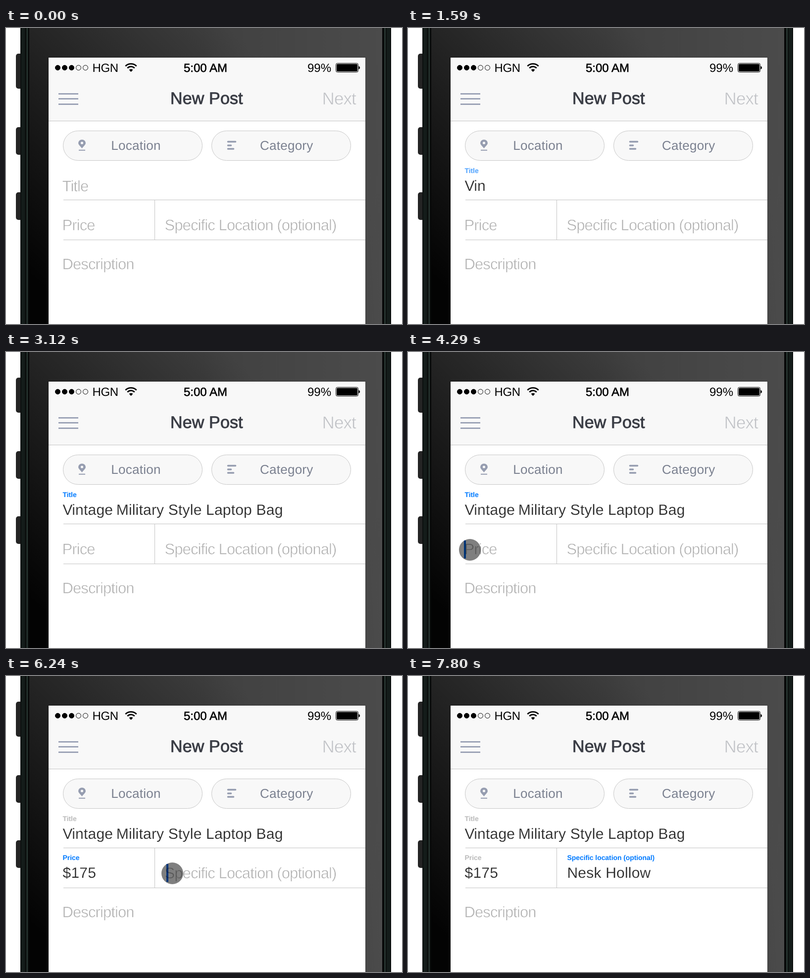
Animation, 800 px wide and 600 px high, one loop 8000 ms. Source, as an HTML page:

```html
<!DOCTYPE html>
<html lang="en">
<head>
<meta charset="utf-8">
<title>New Post form</title>
<style>
  html, body { margin: 0; width: 100%; height: 100%; overflow: hidden; background: #fff; }
  svg { display: block; width: 800px; height: 600px; }
  text { font-family: "Liberation Sans", Arial, sans-serif; white-space: pre; text-rendering: geometricPrecision; }
  .light { font-size: 31px; letter-spacing: -.9px; fill: #b0b0b0; stroke: #fff; stroke-width: .7px; }
  .next { font-size: 35px; fill: #c0c2c6; stroke: #f8f8f8; }
  .typed { font-size: 30px; letter-spacing: .2px; fill: #2b2b2b; stroke: #fff; stroke-width: .2px; }
  .label { font-size: 14px; font-weight: bold; letter-spacing: -.08px; }
  .title { font-size: 34px; letter-spacing: .15px; fill: #3a3d45; stroke: #3a3d45; stroke-width: .9px; }
  .status { font-size: 24px; }
  .pill text { font-size: 26px; letter-spacing: .25px; fill: #7b8190; }
  .pill rect { fill: #f8f8f8; stroke: #c8c8c8; }
  .rule { stroke: #c4c4c4; fill: none; }
  .cursor { fill: #0068ec; mix-blend-mode: multiply; }
</style>
</head>
<body>
<svg viewBox="0 0 800 600">
  <defs>
    <linearGradient id="face" gradientUnits="userSpaceOnUse" x1="40" y1="490" x2="490" y2="40">
      <stop offset="0" stop-color="#030303"/>
      <stop offset=".5" stop-color="#212121"/>
      <stop offset="1" stop-color="#404040"/>
    </linearGradient>
    <linearGradient id="shine">
      <stop offset="0" stop-color="#4b4b4b" stop-opacity="0"/>
      <stop offset="1" stop-color="#4b4b4b"/>
    </linearGradient>
    <clipPath id="screen"><path d="M86 60h640v540H86z"/></clipPath>
  </defs>

  <!-- phone body -->
  <g fill="#242424">
    <rect x="20" y="52" width="20" height="71" rx="5"/>
    <rect x="20" y="201" width="20" height="56" rx="5"/>
    <rect x="20" y="333" width="20" height="56" rx="5"/>
  </g>
  <path d="M29 0h749v600H29z" fill="#0b0f0e"/>
  <path d="M34.5 0v600M772.5 0v600" stroke="#141c1a" stroke-width="7"/>
  <path d="M43 0v600M765.5 0v600" stroke="#26332f" stroke-width="3"/>
  <path d="M46 0v600M762 0v600" stroke="#060707" stroke-width="3"/>
  <path d="M47 0h713v600H47z" fill="url(#face)"/>
  <path d="M400 0h360v600H400z" fill="url(#shine)"/>
  <path d="M85.5 600V59.5h641v540.5" fill="none" stroke="#000" stroke-opacity=".2"/>
  <path d="M86 60h640v540H86z" fill="#fff"/>
  <path d="M86 60h640v128H86z" fill="#f8f8f8"/>
  <path class="rule" d="M86 188.5h640"/>

  <!-- status bar -->
  <g id="dots" stroke="#000"></g>
  <text class="status" x="174.5" y="89" letter-spacing="-.4">HGN</text>
  <g fill="none" stroke="#000" stroke-width="2.8">
    <path d="M241.4 77.2a15.8 15.8 0 0 1 22.2 0M245.3 81.2a10.2 10.2 0 0 1 14.4 0"/>
    <path d="M252.5 89l-3.9-4.2a5.6 5.6 0 0 1 7.8 0z" fill="#000" stroke="none"/>
  </g>
  <text class="status" x="359" y="89" stroke="#000" stroke-width=".6">5:00 AM</text>
  <text class="status" x="609" y="89">99%</text>
  <rect x="666.5" y="71.5" width="45" height="18" rx="3" fill="none" stroke="#000"/>
  <rect x="668" y="73" width="42" height="15" rx="1.5"/>
  <path d="M712.5 77.5q2.5 0 2.5 3t-2.5 3z"/>

  <!-- navigation -->
  <path d="M106 133.5h40M106 143.5h40M106 154.5h40" stroke="#8f97ad" stroke-width="2.5"/>
  <text class="title" x="332" y="154">New Post</text>
  <text class="light next" x="638.5" y="155">Next</text>

  <!-- filters -->
  <g class="pill">
    <rect x="115.5" y="208.5" width="281" height="60" rx="30"/>
    <rect x="415.5" y="208.5" width="281" height="60" rx="30"/>
    <text x="212.3" y="247">Location</text>
    <text x="513" y="247">Category</text>
  </g>
  <path d="M153.5 244c-3-4-7.5-7.5-7.5-11a7.5 6.8 0 0 1 15 0c0 3.5-4.5 7-7.5 11z" fill="#969db0"/>
  <circle cx="153.5" cy="233" r="2.6" fill="#f8f8f8"/>
  <path d="M147 247.7h13" stroke="#969db0" stroke-width="2"/>
  <path d="M448.5 230.5h15M448.5 238h6M448.5 245h11" stroke="#969db0" stroke-width="3.6" stroke-linecap="round"/>

  <!-- form -->
  <path class="rule" d="M116 348.5h610M116 429.5h610M300.5 348v81"/>
  <text class="light" x="113.5" y="489">Description</text>
  <g id="form" clip-path="url(#screen)"></g>
</svg>

<script>
const LOOP = 8000, STEP = 30, FADE = 270, TYPE = 870, KEY = 50;
const BLUE = [0, 122, 255], GREY = [186, 186, 186];
const IDLE = [176, 176, 176], FOCUSED = [132, 132, 132];

const clamp = v => Math.max(0, Math.min(1, v));
const easeOut = p => 1 - (1 - p) ** 3;
const mix = (a, b, p) => `rgb(${a.map((v, i) => v + (b[i] - v) * p)})`;

function add(parent, tag, attrs, text = '') {
  const el = document.createElementNS('http://www.w3.org/2000/svg', tag);
  for (const k in attrs) el.setAttribute(k, attrs[k]);
  el.textContent = text;
  return parent.appendChild(el);
}

const dots = document.getElementById('dots');
for (let i = 0; i < 5; i++)
  add(dots, 'circle', { cx: 104.5 + 14 * i, cy: 80.5, r: 5, fill: i < 3 ? '#000' : 'none' });

// focus/blur: times in ms; delay: wait from label rise to the first key
const fields = [
  { hint: 'Title', value: 'Vintage Military Style Laptop Bag', dx: '0 -1 0 0 0 0 0 -2',
    x: 113.5, y: 331, cx: 125, cy: 321, focus: 540, blur: 4290, delay: 80 },
  { hint: 'Price', value: '$175',
    x: 113.5, y: 410, cx: 125, cy: 401, focus: 4290, blur: 6240, delay: 175 },
  { hint: 'Specific Location (optional)', label: 'Specific location (optional)', value: 'Nesk Hollow',
    x: 320.5, y: 410, cx: 336, cy: 400, focus: 6240, blur: LOOP, delay: 172 }
];

const form = document.getElementById('form');
for (const f of fields) {
  f.hintEl = add(form, 'text', { class: 'light', x: f.x, y: f.y }, f.hint);
  f.labelEl = add(form, 'text', { class: 'label', x: f.x + 1 }, f.label || f.hint);
  f.valueEl = add(form, 'text', { class: 'typed', x: f.x + 1, y: f.y - 1, dx: f.dx || 0 });
  f.cursorEl = add(form, 'rect', { class: 'cursor', x: f.cx - 12, y: f.cy - 19, width: 4, height: 36.5 });
  f.tapEl = add(form, 'circle', { cx: f.cx, cy: f.cy });
}

function drawField(f, t) {
  const since = t - f.focus, typing = since - TYPE;
  const tap = clamp(since / FADE), rise = clamp((typing + STEP) / (FADE + STEP));

  f.tapEl.setAttribute('r', 22 + 25.2 * easeOut(tap));
  f.tapEl.setAttribute('opacity', since < 0 ? 0 : .5 * (1 - tap) ** 1.7);

  const blink = since >= 0 && since < FADE || since >= 600 && since < TYPE;
  f.cursorEl.setAttribute('opacity', blink ? 1 : 0);

  f.hintEl.style.fill = mix(IDLE, FOCUSED, tap);
  f.hintEl.setAttribute('opacity', 1 - clamp((typing + STEP) / 90));

  f.labelEl.setAttribute('y', f.y - 37 + 12 * (1 - easeOut(rise)));
  f.labelEl.setAttribute('opacity', rise);
  f.labelEl.setAttribute('fill', mix(BLUE, GREY, clamp((t - f.blur) / FADE)));

  const keys = Math.max(0, Math.floor((typing - f.delay) / KEY) + 1);
  const typed = f.value.slice(0, keys);
  if (f.valueEl.textContent !== typed) f.valueEl.textContent = typed;
}

function frame() {
  const t = Math.floor(performance.now() % LOOP / STEP) * STEP;
  fields.forEach(f => drawField(f, t));
  requestAnimationFrame(frame);
}
frame();
</script>
</body>
</html>
```
